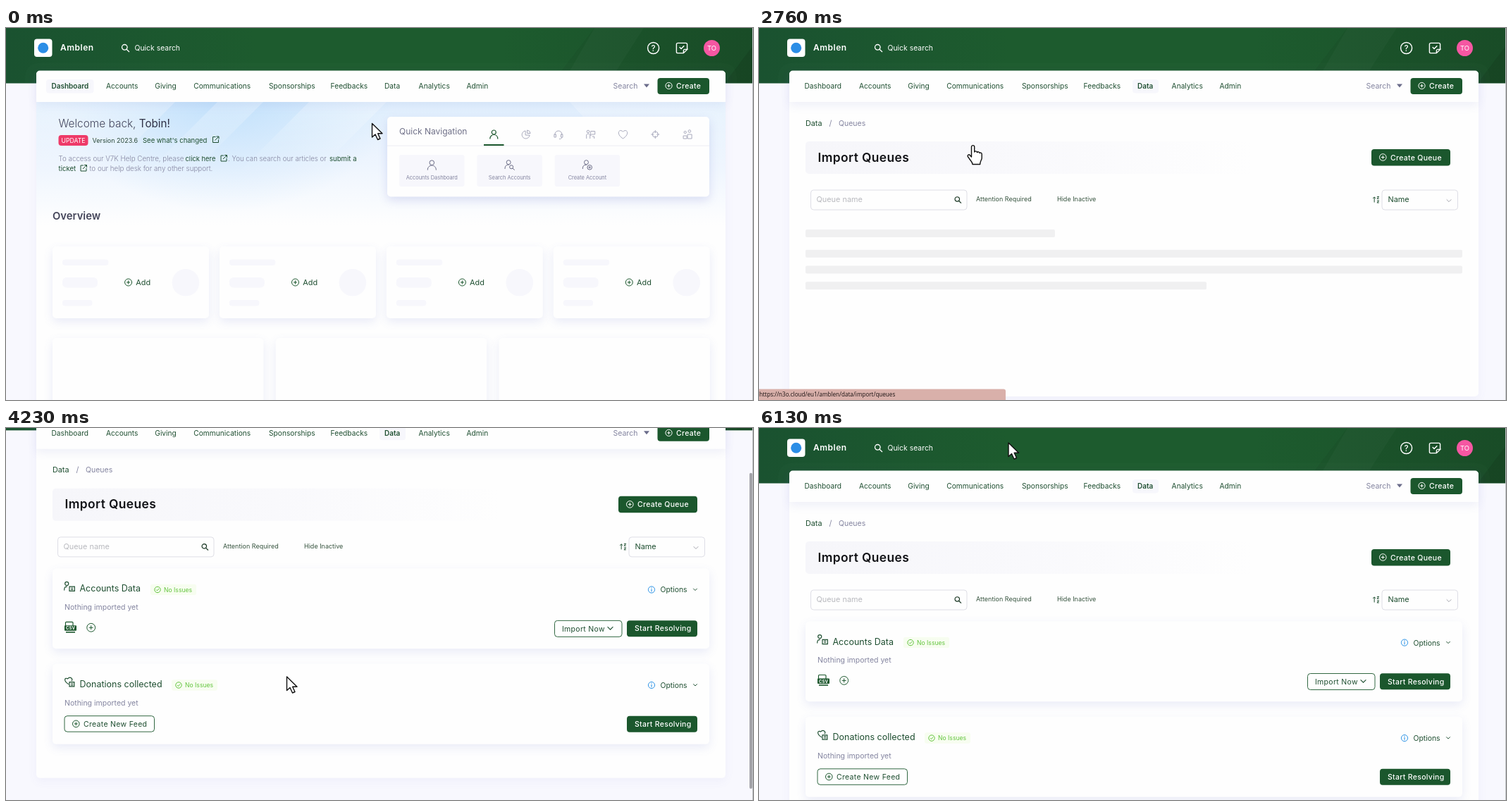
These frames come from a looping animation (1060x528 px, 6260 ms). An HTML page with a canvas:

```html
<!DOCTYPE html>
<html lang="en">
<head>
<meta charset="utf-8">
<title>Import queues walkthrough</title>
<style>
html, body { margin: 0; width: 100%; height: 100%; overflow: hidden; background: #f8f8fe; }
canvas { display: block; width: 1060px; height: 528px; }
</style>
</head>
<body>
<canvas id="stage"></canvas>
<script>
const W = 1060, H = 528, LOOP = 6260;
const canvas = document.getElementById('stage');
const ctx = canvas.getContext('2d');
const dpr = window.devicePixelRatio || 1;
canvas.width = W * dpr;
canvas.height = H * dpr;

const GREEN = '#1b572d', INK = '#1f4f31', GREY = '#8485a0', PALE = '#f7f7fc', BONE = '#f0f0f1', WHITE = '#fefefe';
const BRAND = 'Amblen', USER = 'Tobin';
const SITE = 'https://n3o.cloud/eu1/amblen/data';

const ICON = {
  user: 'M-3-3a3 3 0 1 0 6 0a3 3 0 1 0-6 0M-5.5 6.5c0-8 11-8 11 0',
  userSearch: 'M-4-3.5a2.7 2.7 0 1 0 5.4 0a2.7 2.7 0 1 0-5.4 0M-6 5c0-5 3-5.5 5-5M0 2.5a2.3 2.3 0 1 0 4.6 0a2.3 2.3 0 1 0-4.6 0M4 4.3L6.5 6.5',
  userPlus: 'M-4-3.5a2.7 2.7 0 1 0 5.4 0a2.7 2.7 0 1 0-5.4 0M-6 5c0-5 3-5.5 5-5M0 3a3 3 0 1 0 6 0a3 3 0 1 0-6 0M3 1.5v3M1.5 3h3',
  pie: 'M-1-5a5.5 5.5 0 1 0 6 6H-1zM1.5-6a5 5 0 0 1 4.5 4.5H1.5z',
  headset: 'M-5 1V0a5 5 0 0 1 10 0v1M-6 0h2.5v4H-6zM3.5 0H6v4H3.5zM5 4c0 2-2 2.5-4 2.5',
  talk: 'M-5.5-4a1.8 1.8 0 1 0 3.6 0a1.8 1.8 0 1 0-3.6 0M-6 6V1c0-2.5 5-2.5 5 0v5M0-4.5h6v4.5H2L0 1.5zM2 3h3v3',
  heart: 'M0 6C-11-1-5-9 0-3.8C5-9 11-1 0 6z',
  target: 'M-4 0a4 4 0 1 0 8 0a4 4 0 1 0-8 0M0-6v4M0 6V2M-6 0h4M6 0H2',
  group: 'M-5-3a1.6 1.6 0 1 0 3.2 0a1.6 1.6 0 1 0-3.2 0M1-4.5a1.8 1.8 0 1 0 3.6 0a1.8 1.8 0 1 0-3.6 0M-6 6V2h5v4zM0 6V0h6v6z',
  link: 'M0-4H-4V4H4V0M1-4.5H4.5V-1M4.5-4.5L-1 1',
  search: 'M-5-1.2a3.8 3.8 0 1 0 7.6 0a3.8 3.8 0 1 0-7.6 0M1.6 1.8L5.5 5.5',
  down: 'M-3-1.5L0 1.5L3-1.5',
  right: 'M-2-4L2 0L-2 4',
  check: 'M-2 0L-.5 1.5L2-1.5',
  list: 'M5-1V-6H-5V6H0M-2.5-3h5M-2.5 0h3M3.5 1v5M1 4l2.5 2.5L6 4',
  upload: 'M-6 2v4H6V2M0 3V-6M-3-3L0-6L3-3',
  note: 'M8 2V-5.5Q8-7.5 6-7.5H-6Q-8-7.5-8-5.5V5.5Q-8 7.5-6 7.5H2.5L8 2H4Q2.5 2 2.5 4V7.5M-3.5-1.5L-1 1L3.5-3.5',
  doc: 'M-11-14H3L11-6V14H-11zM3-14V-6H11M-5-1H5M-5 5H5',
  accountFeed: 'M-6-4a2.4 2.4 0 1 0 4.8 0a2.4 2.4 0 1 0-4.8 0M-7 5c0-5 2-5 4-5M0 0H7V6H0zM2 2h3M2 4h3',
  heartFeed: 'M-1 3C-9-2-6-7-2.5-4.5C1-8 5-5 3-1.5M0 0H6.5V6H0zM2 2h3M2 4h3',
  sort: 'M-3 4V-4M-5-2L-3-4L-1-2M1-4.5H4L1-1.5H4M1 1.5H4L1 4.5H4'
};
const shapes = {};
for (const k in ICON) shapes[k] = new Path2D(ICON[k]);
const ARROW = new Path2D('M0 0V19.5L4.5 15.5L8 23L11.5 21.5L8.2 14.2H14.5z');
const HAND = new Path2D('M6 17V2.7a2.1 2.1 0 0 1 4.2 0V10c.4-1.6 3.4-1.5 3.8.6c.6-1.3 3.3-1 3.5.9c.8-1 3.2-.5 3.2 1.5v5.5c0 3-2.5 4-2.5 9H7.5c0-3.5-3-5-4.8-8.3L.8 16.5c-1-2.2 1.6-3.6 3-2z');

const clamp = v => Math.max(0, Math.min(1, v));
const within = (t, a, b) => t >= a && t < b;

// Returns the x where the text ends, so runs can follow each other.
function text(s, x, y, size, color = INK, weight = 400, align = 'left', spacing = 0) {
  ctx.font = `${weight} ${size}px Inter, "Open Sans", sans-serif`;
  ctx.letterSpacing = spacing + 'px';
  ctx.textAlign = align;
  ctx.fillStyle = color;
  ctx.fillText(s, x, y);
  return x + ctx.measureText(s).width;
}
function box(x, y, w, h, r, fill, stroke, lw = 1) {
  ctx.beginPath();
  ctx.roundRect(x, y, w, h, r);
  if (fill) { ctx.fillStyle = fill; ctx.fill(); }
  if (stroke) { ctx.strokeStyle = stroke; ctx.lineWidth = lw; ctx.stroke(); }
}
function card(x, y, w, h, r = 5, fill = WHITE, strength = .13) {
  ctx.save();
  ctx.shadowColor = `rgba(95,105,200,${strength})`;
  ctx.shadowBlur = 14 * dpr;
  ctx.shadowOffsetY = 5 * dpr;
  box(x, y, w, h, r, fill);
  ctx.restore();
}
function poly(fill, ...pts) {
  ctx.beginPath();
  for (let i = 0; i < pts.length; i += 2) ctx.lineTo(pts[i], pts[i + 1]);
  ctx.fillStyle = fill;
  ctx.fill();
}
function line(x1, y1, x2, y2, color, lw = 1) {
  ctx.beginPath();
  ctx.moveTo(x1, y1);
  ctx.lineTo(x2, y2);
  ctx.strokeStyle = color;
  ctx.lineWidth = lw;
  ctx.stroke();
}
function disc(x, y, r, fill, stroke, lw = 1) {
  ctx.beginPath();
  ctx.arc(x, y, r, 0, 7);
  if (fill) { ctx.fillStyle = fill; ctx.fill(); }
  if (stroke) { ctx.strokeStyle = stroke; ctx.lineWidth = lw; ctx.stroke(); }
}
function icon(name, x, y, color = INK, scale = 1, lw = 1) {
  ctx.save();
  ctx.translate(x, y);
  ctx.scale(scale, scale);
  ctx.strokeStyle = color;
  ctx.lineWidth = lw / scale;
  ctx.stroke(shapes[name]);
  ctx.restore();
}
function plus(x, y, color = GREEN, r = 4.8) {
  disc(x, y, r, null, color);
  line(x - r / 2, y, x + r / 2, y, color);
  line(x, y - r / 2, x, y + r / 2, color);
}
function button(label, x, y, w, h, textX, solid = true) {
  if (solid) box(x, y, w, h, 4, GREEN);
  else box(x, y, w, h, 4, null, GREEN, .9);
  text(label, textX, y + h / 2 + 3.8, 10.5, solid ? '#fff' : INK, solid ? 500 : 400, 'left', .3);
}
function gradient(x1, y1, x2, y2, ...colors) {
  const g = ctx.createLinearGradient(x1, y1, x2, y2);
  colors.forEach((c, i) => g.addColorStop(i / (colors.length - 1), c));
  return g;
}

function header() {
  ctx.fillStyle = gradient(0, 0, W, 0, '#1a5230', '#1d5b2e', '#1d5b2e', '#1a5029');
  ctx.fillRect(0, 0, W, 78.5);
  poly('rgba(0,0,0,.05)', 775, 78, 835, 0, 1060, 0, 1060, 78);
  poly('rgba(255,255,255,.025)', 835, 0, 905, 0, 855, 78, 790, 78);
  poly('rgba(0,0,0,.09)', 1020, 78, 1060, 25, 1060, 78);
  box(40, 15.5, 25.5, 25.5, 4, '#fff');
  disc(52.7, 28.2, 7.5, '#2c8ee6');
  text(BRAND, 77, 32.3, 12, '#fff', 600, 'left', .5);
  icon('search', 169.5, 28.5, '#fff', 1, 1.3);
  text('Quick search', 182.5, 32, 10.4, '#fff');
  disc(918.6, 28.5, 8, null, '#fff', 1.4);
  text('?', 918.6, 32.5, 11.5, '#fff', 500, 'center');
  icon('note', 959, 28.5, '#fff', .95, 1.4);
  disc(1001.5, 28.5, 11.5, '#f557a2');
  text(USER.slice(0, 2).toUpperCase(), 1001.5, 32, 9.5, '#fff', 400, 'center');
}

const NAV = [['Dashboard', 64.5], ['Accounts', 142], ['Giving', 211.3], ['Communications', 266.3],
  ['Sponsorships', 373], ['Feedbacks', 460.6], ['Data', 537], ['Analytics', 585.6], ['Admin', 653.5]];

function navBar(active, hoverData) {
  card(43, 60.5, 978, 44.5, [5, 5, 0, 0], WHITE, .1);
  if (active === 'Dashboard') box(57, 73, 67.5, 19.5, 4, PALE);
  if (active === 'Data' || hoverData) box(530, 73, 37, 19.5, 4, PALE);
  for (const [label, x] of NAV) {
    const on = label === active;
    text(label, x, 86.2, on ? 10 : 10.2, INK, on ? 600 : 400);
  }
  text('Search', 861.5, 86.2, 10.5, GREY);
  poly('#6a6c8a', 905, 79.5, 913, 79.5, 909, 84.5);
  button('Create', 924.5, 71, 73.5, 23, 951);
  plus(940.5, 82, '#fff', 4.6);
}

function hero() {
  ctx.save();
  ctx.beginPath();
  ctx.rect(43, 105, 978, 175);
  ctx.clip();
  ctx.fillStyle = gradient(0, 105, 0, 280, '#e0effd', '#eef5fe', WHITE);
  ctx.fillRect(43, 105, 978, 175);
  ctx.translate(310, 100);
  ctx.scale(1.5, 1);
  const glow = ctx.createRadialGradient(0, 0, 5, 0, 0, 160);
  glow.addColorStop(0, 'rgba(170,214,250,.55)');
  glow.addColorStop(1, 'rgba(170,214,250,0)');
  ctx.fillStyle = glow;
  ctx.fillRect(-180, 0, 500, 180);
  ctx.restore();
  const ray = gradient(0, 105, 0, 210, 'rgba(255,255,255,.28)', 'rgba(255,255,255,0)');
  poly(ray, 43, 105, 240, 105, 130, 215, 43, 215);
  poly(ray, 300, 105, 365, 105, 255, 215, 190, 215);
  poly(ray, 430, 105, 540, 105, 430, 215, 320, 215);
  poly(ray, 800, 105, 1021, 105, 1021, 215, 900, 215);
}

function dashboard() {
  hero();
  const nameX = text('Welcome back, ', 74.5, 141, 15.4, '#44465c', 300);
  text(USER + '!', nameX, 141, 15.2, '#2e3044');
  box(74.5, 152, 42, 15, 4, '#ee3a68');
  text('UPDATE', 95.5, 163, 8.7, '#fff', 400, 'center');
  text('Version 2023.6', 122.5, 163, 9, '#2c4a3a');
  text("See what's changed", 194, 163, 9.5);
  icon('link', 297.5, 158.5);
  text('To access our V7K Help Centre, please', 74.5, 189.2, 9.8, GREY, 300);
  text('click here', 254.5, 189.2, 9.4);
  icon('link', 309, 185);
  text('. You can search our articles or', 315, 189.2, 9.7, GREY, 300);
  text('submit a', 459, 189.2, 9.6);
  text('ticket', 74.5, 203.2, 9.6);
  icon('link', 110, 199);
  text('to our help desk for any other support.', 118.5, 203.2, 9.8, GREY, 300);

  card(541, 126, 457, 113.5, 5, WHITE, .2);
  text('Quick Navigation', 558, 150.5, 12, '#6f7088');
  line(541, 167, 998, 167, '#ececf3');
  ctx.fillStyle = GREEN;
  ctx.fillRect(678, 165, 28.5, 2);
  ['user', 'pie', 'headset', 'talk', 'heart', 'target', 'group'].forEach((name, i) =>
    icon(name, 692.3 + i * 45.8, 151, i ? '#a9aabd' : GREEN, 1, i ? 1 : 1.2));
  [['user', 'Accounts Dashboard'], ['userSearch', 'Search Accounts'], ['userPlus', 'Create Account']].forEach(([name, label], i) => {
    const x = 558 + i * 110.3;
    box(x, 180, 92.5, 45, 3, PALE);
    icon(name, x + 46.3, 194.5, '#6a6b85', 1.1);
    text(label, x + 46.3, 214.5, 7.4, GREY, 400, 'center');
  });

  text('Overview', 66, 271.7, 14.8, '#44455a', 600);
  for (let i = 0; i < 4; i++) {
    const x = 66 + i * 236.9;
    card(x, 310, 222, 102);
    box(x + 14, 328.5, 65.5, 8.5, 4, PALE);
    box(x + 14, 354, 50, 14.5, 6, PALE);
    box(x + 14, 386, 42.5, 8.5, 4, PALE);
    disc(x + 189, 361.3, 19.3, PALE);
    plus(x + 107.6, 361, GREEN, 5);
    text('Add', x + 118.3, 365, 10.9);
  }
  for (let i = 0; i < 3; i++) card(66 + i * 316.7, 440, 299.5, 120);
}

function dashedBox(x, y, w, h) {
  ctx.setLineDash([2, 1.5]);
  box(x, y, w, h, 4, null, '#b9bacb', .9);
  ctx.setLineDash([]);
}
function metric(x) {
  box(x, 392, 106, 10, 1, '#e8e9f0');
  box(x, 409.5, 40, 7, 1, '#f3f3f6');
  text('£0,000', x + 1, 472.5, 17.2, '#e6e7ee', 600);
  poly('#dcdde6', x + 135, 470, x + 149, 470, x + 142, 461.5);
}
function gettingStarted() {
  text('Getting Started with Data', 552, 151.7, 12, '#1c4029');
  text('From here, you can import and export data from the system, funnel data through', 552, 172.7, 8.9, GREY);
  text('to other systems and configure what happens when your data changes.', 552, 185.7, 8.9, GREY);
  const blue = '#3d8fe6';
  [['Introduction to the Data section', 728], ['Creating your first list', 683], ['Connecting a list', 664.5]].forEach(([label, x], i) => {
    const y = 208 + i * 13.5;
    disc(573, y - 2.5, 1.4, '#6d6f8a');
    text(label, 581, y, 9, blue);
    icon('link', x, y - 4, '#787a90', .85);
  });
  text('Learn more about Data', 552, 256.6, 9, blue);
  icon('link', 662, 253, INK, .9, 1.2);

  poly('#aee8a6', 916, 159, 922, 163, 916, 167);
  poly('#fff', 917.2, 161, 920.3, 163, 917.2, 165);
  line(975, 181, 986, 174, '#f6c9b2');
  line(926, 242, 930, 232, '#f3a9a0');
  line(911, 179, 915, 187, '#f4b7c9');
  disc(903.5, 198, 2.6, '#5b9fea');
  disc(951, 169, 1.8, '#c3b5f4');
  disc(911, 220.5, 2.8, null, '#cfd8f3');
  disc(979, 202, 2, null, '#b8d7f5');
  disc(948, 231, 1.5, '#8fb0ef');
  poly('#7edbd6', 968, 228, 974.5, 224.5, 974.5, 232);
  ctx.save();
  ctx.shadowColor = 'rgba(90,90,150,.16)';
  ctx.shadowBlur = 10 * dpr;
  disc(943.7, 199.7, 27, '#fff');
  ctx.restore();
  icon('doc', 943.7, 199.7, '#e52b9c', 1, 2.6);
}
function activity() {
  [['Feed Created', 86, '21/11/2023 04:27', 'DF1001: CSV Upload (Account)'],
   ['Queue Created', 93.5, '20/11/2023 01:48', 'DQ1002: Donations collected'],
   ['Queue Created', 93.5, '20/11/2023 01:47', 'DQ1001: Accounts Data']].forEach(([tag, w, date, title], i) => {
    const y = 369 + i * 52;
    box(716, y, w, 15, 4, '#06b07c');
    text(tag, 738, y + 11, 9.1, '#fff');
    text(date, 975, y + 8.3, 7.8, GREY, 300, 'right');
    text(title, 716, y + 28.3, 9.4, GREY);
    icon('right', 969, y + 25, INK, 1, 1.3);
    if (i < 2) line(716, y + 42, 975, y + 42, '#ededf2');
  });
}

function dataPage(t) {
  const loaded = t >= 1300, grow = loaded ? 46 : 0;
  const p = clamp((t - 860) / 400);
  ctx.save();
  ctx.globalAlpha = clamp(p * 3 + .2);
  ctx.translate(0, 20 * (1 - p) ** 2);
  card(66, 127, 458, 107.5 + grow);
  [['list', 'Lists', 85], ['upload', 'Imports', 231]].forEach(([name, label, x]) => {
    box(x, 139, 128, 45, 3, PALE);
    icon(name, x + 64, 154, '#6a6b85');
    text(label, x + 64, 174, 7.4, GREY, 400, 'center');
  });
  box(541, 127, 457, 107.5 + grow, 5, gradient(541, 0, 760, 0, WHITE, '#f6f6fa'));
  if (loaded) gettingStarted();
  else [[166, 150], [435, 179], [266, 202]].forEach(([w, y]) => box(552, y, w, 11, 2, BONE));

  ctx.translate(0, grow - 46);
  text('Data Insights', 66, 320, 14.7, '#242631');
  text('Recent Activity', 699, 320, 14.9, '#242631');
  card(66, 342, 616, 400);
  card(699, 342, 299, 400);
  dashedBox(83, 359.5, 182.5, 149.5);
  plus(148, 433, '#33384a', 4.8);
  text('Pin Metric', 158.3, 437.4, 10, '#3a3c4c');
  dashedBox(282.5, 359.5, 382, 149.5);
  line(474, 377, 474, 491, '#f3f3f6');
  poly(gradient(0, 392, 0, 490, '#eeeef3', '#fafafc'), 493, 440, 523, 445, 556, 425, 588, 436, 614, 412, 645, 392, 645, 490, 493, 490);
  metric(303);
  metric(493.3);
  [[83, 182.5], [282.5, 183], [482.5, 182]].forEach(([x, w], i) => {
    dashedBox(x, 526.5, w, 150);
    if (i) box(x + 20, 558, 100, 9, 1, '#e8e9f0');
  });
  if (t >= 1650) activity();
  else [[105, 371], [275, 399.5], [275, 422.5], [168, 445.5]].forEach(([w, y]) => box(716, y, w, 11, 2, BONE));
  ctx.restore();
}

function queueCard(y, title, kind, tagX) {
  card(66, y, 932, 114);
  icon(kind, 90, y + 26, INK, 1.05, 1.2);
  text(title, 104.5, y + 33.2, 12.5);
  box(tagX, y + 22.5, 65, 15.5, 3, '#f7fdf0');
  disc(tagX + 10, y + 30.3, 4.2, null, '#62c43c');
  icon('check', tagX + 10, y + 30.3, '#62c43c');
  text('No Issues', tagX + 19, y + 33.5, 8.6, '#62c43c');
  text('Nothing imported yet', 83, y + 59, 10.5, GREY);
  disc(916, y + 30.3, 4.6, null, '#2c93e6');
  line(916, y + 29.3, 916, y + 33, '#2c93e6', 1.1);
  line(916, y + 27.3, 916, y + 28.4, '#2c93e6', 1.1);
  text('Options', 928.5, y + 34.2, 10.4);
  icon('down', 978, y + 30, INK, .9);
  button('Start Resolving', 881, y + 74, 100, 23, 892);
}
function queuesPage(loaded) {
  text('Data', 66, 138.5, 10.8);
  text('/', 99.5, 138.5, 10.8, GREY);
  text('Queues', 113, 138.5, 10.5, GREY);
  box(66, 161, 754, 46, 5, gradient(66, 0, 700, 0, '#f6f6fa', '#f9f9fc', WHITE));
  text('Import Queues', 83.5, 189.6, 17.4, '#111216', 600, 'left', .4);
  button('Create Queue', 869, 172, 112, 23.5, 896);
  plus(885.3, 183.5, '#fff');
  box(73.5, 230, 221.5, 28, 4, null, '#dedee6');
  text('Queue name', 81.5, 247.4, 10.9, '#b9babf');
  icon('search', 282.3, 244, '#15331f', .85, 1.2);
  text('Attention Required', 308, 246.2, 9, '#37543f');
  text('Hide Inactive', 423, 246.2, 9, '#37543f');
  icon('sort', 876, 243.7, INK, .95);
  box(884, 230, 107.5, 28, 4, null, '#dedee6');
  text('Name', 892.5, 247.4, 10.9);
  icon('down', 979, 245, '#a4a5ae', 1.1);
  if (!loaded) {
    [[354, 286], [932, 314.7], [932, 337.5], [569, 360.3]].forEach(([w, y]) => box(66, y, w, 11, 2, BONE));
    return;
  }
  queueCard(274.3, 'Accounts Data', 'accountFeed', 205);
  box(84.5, 350.5, 10.5, 8, 1, null, GREEN, 1.2);
  box(83, 355.5, 17, 7.5, 1, GREEN);
  line(85, 365, 98, 365, GREEN, 1.6);
  text('CSV', 91.5, 361.6, 6, '#fff', 700, 'center');
  plus(120.7, 358.4, GREEN, 5.9);
  button('Import Now', 778.5, 348.5, 95.5, 23, 789, false);
  icon('down', 857.5, 359.3, INK, 1.3, 1.1);
  queueCard(409.8, 'Donations collected', 'heartFeed', 235);
  button('Create New Feed', 83, 483.8, 127.5, 22.5, 110, false);
  plus(99.3, 495, GREEN);
}

// One small first step, a steady run to the bottom, then a decelerating return.
const SCROLL_MAX = 94;
function scrollAt(t) {
  if (t < 3930 || t >= 4830) return 0;
  if (t < 4000) return 6.5;
  if (t < 4590) return 6.5 + (SCROLL_MAX - 6.5) * clamp((t - 3980) / 320);
  return SCROLL_MAX * (1 - (t - 4590) / 240) ** 1.35;
}
function scrollbar(t, scroll) {
  ctx.fillStyle = '#c0c2c6';
  ctx.fillRect(1059, 0, 1, H);
  if (t < 4000) return;
  const ratio = H / (H + SCROLL_MAX);
  ctx.globalAlpha = 1 - clamp((t - 5860) / 250);
  box(1055, scroll * ratio, 4, H * ratio, 2, '#a3a3a8');
  ctx.globalAlpha = 1;
}

const PATH = [[30, 519.5, 135.5], [630, 544.5, 86], [1530, 544.5, 86], [2000, 301, 186], [2230, 301, 186],
  [2360, 303.5, 166], [2770, 303.5, 166], [3360, 368, 153], [3390, 368, 153], [3600, 398.5, 353],
  [5220, 398.5, 353], [5830, 355, 30], [5860, 355, 30], [6000, 354, 21]];

function pointer(t) {
  let i = PATH.findIndex(k => k[0] > t);
  let [x, y] = i === 0 ? PATH[0].slice(1) : PATH[PATH.length - 1].slice(1);
  if (i > 0) {
    const [t0, x0, y0] = PATH[i - 1], [t1, x1, y1] = PATH[i];
    const p = (t - t0) / (t1 - t0), e = p * p * (3 - 2 * p);
    x = x0 + (x1 - x0) * e;
    y = y0 + (y1 - y0) * e;
  }
  const hand = within(t, 500, 1600) || within(t, 2260, 2800);
  ctx.save();
  ctx.translate(hand ? x - 8 : x, y);
  ctx.lineJoin = 'round';
  ctx.fillStyle = '#fff';
  ctx.strokeStyle = '#111';
  ctx.lineWidth = 1.4;
  const shape = hand ? HAND : ARROW;
  ctx.fill(shape);
  ctx.stroke(shape);
  ctx.restore();
}

function statusBar(url) {
  box(0, 512.5, 350, 16, [0, 3, 0, 0], '#d9b0aa');
  ctx.font = '8.1px "Open Sans", "Noto Sans", sans-serif';
  ctx.letterSpacing = '0px';
  ctx.textAlign = 'left';
  ctx.fillStyle = '#1a1212';
  ctx.fillText(url, 0.5, 523.3);
}

function draw(t) {
  const scroll = scrollAt(t), loaded = t >= 2900;
  ctx.setTransform(dpr, 0, 0, dpr, 0, 0);
  ctx.fillStyle = '#f8f8fe';
  ctx.fillRect(0, 0, W, H);
  ctx.save();
  ctx.translate(0, -scroll);
  header();
  const bottom = t < 2560 ? 640 : loaded ? 572 : 523;
  card(43, 61, 978, bottom - 61, 5, WHITE, .06);
  if (t < 860) dashboard();
  else if (t < 2560) dataPage(t);
  else queuesPage(loaded);
  navBar(t < 860 ? 'Dashboard' : t < 1300 ? '' : 'Data', within(t, 500, 1300));
  ctx.restore();

  scrollbar(t, scroll);
  if (within(t, 520, 1340)) statusBar(SITE);
  if (within(t, 2290, 2800)) statusBar(SITE + '/import/queues');
  pointer(t);
}

const start = performance.now();
function tick() {
  draw((performance.now() - start) % LOOP);
  requestAnimationFrame(tick);
}
tick();
</script>
</body>
</html>
```
